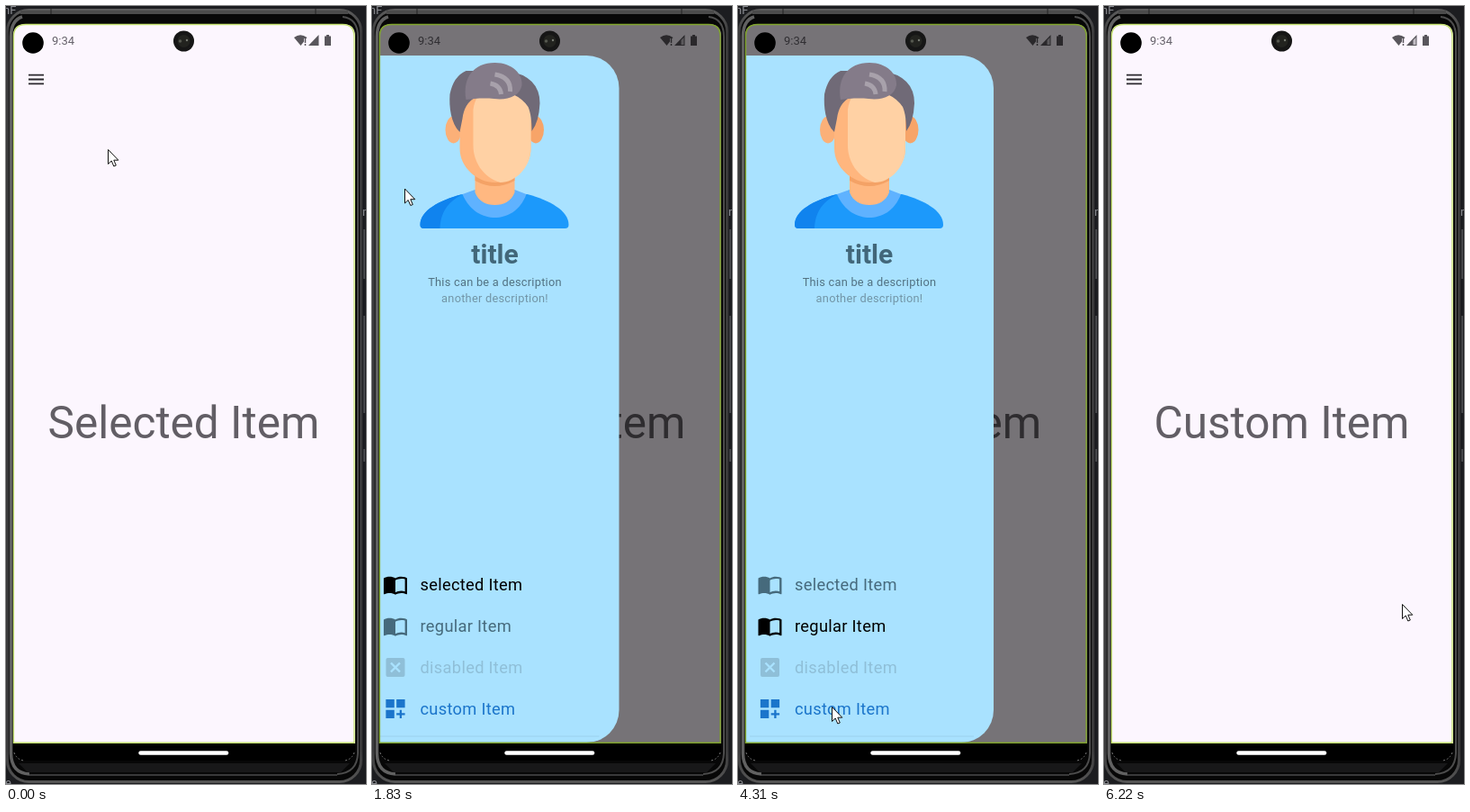
These frames come from a looping animation (400x864 px, 6.54 s). An HTML page:

```html
<!DOCTYPE html>
<html lang="en">
<head>
<meta charset="utf-8">
<title>Navigation drawer</title>
<style>
html, body { margin: 0; width: 100%; height: 100%; overflow: hidden; background: #1c1d20; }
svg { display: block; width: 100vw; height: 100vh; }
text { font-family: Roboto, sans-serif; }
.mid { text-anchor: middle; }
.item text { font-size: 18.3px; letter-spacing: .3px; }
.note { font-size: 12.8px; letter-spacing: .25px; }
</style>
</head>
<body>
<svg viewBox="0 0 400 864">
  <defs>
    <clipPath id="screen"><path d="M8 819V34Q8 20 22 20H374Q388 20 388 34V819Z"/></clipPath>
    <linearGradient id="rim" x2="0" y2="1">
      <stop offset="0" stop-color="#5c5c5c"/>
      <stop offset=".03" stop-color="#3a3a3b"/>
      <stop offset=".96" stop-color="#3a3a3b"/>
      <stop offset="1" stop-color="#555"/>
    </linearGradient>
    <g id="book">
      <path transform="scale(1.18) translate(-12 -12)" d="M21 5C19.900 4.650 18.700 4.500 17.500 4.500C15.500 4.500 13.500 4.900 12 6C10.500 4.900 8.500 4.500 6.500 4.500S2.500 4.900 1 6V20.700Q1.200 21.300 1.800 21.100C3.100 20.400 5 20 6.500 20C8.500 20 10.500 20.400 12 21.500C13.400 20.600 15.800 20 17.500 20C19.200 20 20.800 20.300 22.200 21.100Q22.800 21.200 23 20.600V6Q22.100 5.300 21 5ZM21 18.500C19.900 18.200 18.700 18 17.500 18C15.800 18 13.400 18.600 12 19.500V8C13.400 7.100 15.800 6.500 17.500 6.500C18.700 6.500 19.900 6.600 21 7Z"/>
    </g>
    <g id="box">
      <rect x="-10.500" y="-10.500" width="21" height="21" rx="2"/>
      <path d="M-5 -5L5 5M5 -5L-5 5" stroke="#a9e2ff" stroke-width="2.400"/>
    </g>
    <g id="tiles">
      <path d="M-10.600 -10.600H-1.200V-1.200H-10.600ZM1.200 -10.600H10.600V-1.200H1.200ZM-10.600 1.200H-1.200V10.600H-10.600Z"/>
      <path d="M5.900 1.200V10.600M1.200 5.900H10.600" stroke="currentColor" stroke-width="2.300"/>
    </g>
  </defs>

  <!-- phone body -->
  <rect width="400" height="864" fill="#1c1d20"/>
  <g fill="#8d8f94" font-size="13">
    <text x="-3" y="9">nF</text>
    <text x="-1" y="867">e</text>
    <text x="396" y="233">m</text>
  </g>
  <path d="M398 248V303M398 344V452M398 492V506" stroke="#56575a" stroke-width="1.500"/>
  <rect x="1.500" y="4.500" width="393" height="857" rx="24" fill="#070707" stroke="url(#rim)" stroke-width="3"/>
  <path d="M16 7H380" stroke="#4b4b4b" stroke-width="4"/>
  <path d="M344 3V9M50 3V9" stroke="#222"/>
  <path d="M18 12Q5.500 16 5.500 34V830Q6 852 26 853" fill="none" stroke="#616161" stroke-width="3.500"/>
  <path d="M374 12Q391 14 391 34V830Q390 852 368 853" fill="none" stroke="#4c4c4c" stroke-width="2"/>
  <path d="M26 854H368" stroke="#39393a" stroke-width="2"/>
  <path d="M14 841H382L372 851H24Z" fill="#181819"/>
  <path d="M8 818H388V826Q387 838 374 838H22Q9 838 8 826Z" fill="#000"/>
  <path d="M9 829Q12 837 20 838M387 829Q384 837 376 838" fill="none" stroke="#777" stroke-dasharray="2 2"/>
  <rect x="147.300" y="827.200" width="100" height="4.500" rx="2.250" fill="#fff"/>

  <g clip-path="url(#screen)">
    <rect x="8" y="20" width="380" height="800" fill="#fcf6fe"/>
    <text x="51" y="43" font-size="13" fill="#65616a">9:34</text>
    <g fill="#59565c">
      <path d="M320 35Q327 29.500 334.500 35L327.500 44Z"/>
      <path d="M332.500 36V41M332.500 42V44" stroke="#fcf6fe" stroke-width="3"/>
      <path d="M332.500 36V41M332.500 42V44" stroke="#59565c" stroke-width="1.500"/>
      <path d="M336 44L347.500 32V44Z"/>
      <path id="weak" d="M343.500 43V38L346.500 35V43Z" fill="#fcf6fe" opacity=".65"/>
      <path d="M354 33.500H356V32H359V33.500H361V44H354Z"/>
    </g>
    <path d="M25 76.700H42M25 81.500H42M25 86.300H42" stroke="#29272c" stroke-width="1.800"/>
    <text id="page" class="mid" x="197.500" y="480" font-size="49.500" fill="#625e65"></text>
    <rect id="scrim" x="8" y="20" width="380" height="800" fill="#000"/>

    <g id="drawer">
      <path d="M9 55H248A36 36 0 0 1 284 91V782A36 36 0 0 1 248 818H9Z" fill="#a9e2ff"/>
      <path d="M13 811H262" stroke="#9bd1ec"/>
      <!-- portrait -->
      <path d="M63 243C63 227 84 216 110 209H182C207 216 228 227 228 243Q228 247 224 247H67Q63 247 63 243Z" fill="#1c99fb"/>
      <path d="M63 243C63 227 84 216 110 209C92 219 86 230 85 247H67Q63 247 63 243Z" fill="#1083ee"/>
      <path d="M110 209C118 228 133 235 146 235S174 228 181 209L168 204H124Z" fill="#5fb2ff"/>
      <path d="M124 180H168V207C164 217 156 221 146 221S128 217 124 207Z" fill="#ffb881"/>
      <path d="M124 187Q145 203 168 187V194Q146 206 124 194Z" fill="#f4a266"/>
      <ellipse cx="100" cy="137.500" rx="9" ry="15" fill="#fbb078"/>
      <ellipse cx="191.500" cy="137.500" rx="9" ry="15" fill="#f7a468"/>
      <path d="M107 112C107 95 125 86 146 86S186 95 186 112V158C186 180 165 196 146 196S107 180 107 158Z" fill="#ffb67e"/>
      <path d="M122 115Q124 98 138 92L178 94L186 112V158C186 180 168 196 152 196C132 190 122 172 122 155Z" fill="#ffd1a4"/>
      <path d="M107 140C97 130 95 112 96 98Q100 78 114 72H160Q196 78 196 108Q195 129 187 139C187 128 186 119 183 112Q177 103 166 98L160 101H125Q112 108 110 125Z" fill="#706a77"/>
      <path d="M114 104C110 80 122 63 146 63C166 63 177 76 176 88C174 100 160 105 145 103C133 102 122 103 114 104Z" fill="#847b89"/>
      <path d="M146 76Q164 79 163 95M141 86Q152 88 153 98" fill="none" stroke="#a8a1ab" stroke-width="5"/>
      <text class="mid" x="146" y="286" font-size="30" font-weight="700" fill="#42677a">title</text>
      <text class="mid note" x="146" y="311" fill="#527283">This can be a description</text>
      <text class="mid note" x="146" y="329" fill="#7295a7">another description!</text>
      <g id="items"></g>
    </g>
  </g>
  <path id="edge" d="M8.500 818.300V34Q8.500 20.500 22 20.500H374Q387 20.500 387 34V818.300Z" fill="none" stroke-width="1.400"/>

  <circle cx="30" cy="41" r="11.800" fill="#000"/>
  <circle cx="197.500" cy="39" r="11.500" fill="#161616"/>
  <circle cx="197.500" cy="39" r="7" fill="#22231f"/>
  <circle cx="193.500" cy="39" r="1.800" fill="#55584f"/>
  <circle cx="201" cy="38" r="1.200" fill="#777a72"/>

  <path id="cursor" d="M.5 .5V16.500L4.200 13L6.800 19L9.300 18L6.800 12.200H11.800Z" fill="#fff" stroke="#111" stroke-linejoin="round"/>
</svg>
<script>
const LOOP = 6540;
const SHUT = -278;
const IDLE = '#466a7c';
const $ = id => document.getElementById(id);

const items = [
  { label: 'selected Item', icon: 'book', page: 'Selected Item', idle: IDLE, on: '#000' },
  { label: 'regular Item', icon: 'book', page: 'Regular Item', idle: IDLE, on: '#000' },
  { label: 'disabled Item', icon: 'box', idle: '#8fbfd8' },
  { label: 'custom Item', icon: 'tiles', page: 'Custom Item', idle: '#1b75cb', on: '#fff' }
];

$('items').innerHTML = items.map((it, i) =>
  `<g class="item" transform="translate(0 ${643 + 46 * i})" fill="currentColor">
    <use href="#${it.icon}" x="35.500" y="-.5"/><text x="63" y="6">${it.label}</text></g>`).join('');
const rows = [...$('items').children];

// time, x, y of the pointer tip
const path = [
  [0, 113, 159], [40, 113, 159], [480, 29, 84], [1620, 29, 84], [1830, 36, 202],
  [2530, 66, 565], [3000, 80, 640], [3450, 92, 692], [3950, 92, 692], [4300, 104, 778],
  [4500, 104, 778], [4900, 331, 669], [5330, 331, 669], [5600, 331, 664], [LOOP, 331, 664]
];

function slope(i, k) {
  const a = path[i - 1], b = path[i], c = path[i + 1];
  if (!a || !c || a[k] === b[k] || b[k] === c[k]) return 0;
  return (c[k] - a[k]) / (c[0] - a[0]);
}

function pointer(t, k) {
  let i = 0;
  while (i < path.length - 2 && t >= path[i + 1][0]) i++;
  const a = path[i], b = path[i + 1], d = b[0] - a[0], u = (t - a[0]) / d;
  const s = u * u * (3 - 2 * u);
  return a[k] + (b[k] - a[k]) * s
    + d * u * (1 - u) * ((1 - u) * slope(i, k) - u * slope(i + 1, k));
}

function ease(t, from, to) {
  const u = Math.min(1, Math.max(0, (t - from) / (to - from))) ** .75;
  return u * u * (3 - 2 * u);
}

const mix = (a, b, u) => a.map((v, i) => Math.round(v + (b[i] - v) * u));

function draw(t) {
  const x = SHUT
    + (-9.5 - SHUT) * ease(t, 1595, 1820)
    + 9.5 * ease(t, 3470, 3620)
    + SHUT * ease(t, 5320, 5580);
  const open = Math.min(1, (x - SHUT) / (-9.5 - SHUT));
  const chosen = t < 3900 ? 0 : t < 4450 ? 1 : 3;

  $('drawer').setAttribute('transform', `translate(${x.toFixed(2)} 0)`);
  $('scrim').setAttribute('opacity', (.53 * open).toFixed(3));
  $('edge').setAttribute('stroke', `rgb(${mix([196, 224, 112], [128, 164, 44], open)})`);
  $('weak').style.display = t < 1700 ? 'none' : '';
  $('page').textContent = items[chosen].page;
  rows.forEach((row, i) => row.style.color = i === chosen ? items[i].on : items[i].idle);
  $('cursor').setAttribute('transform',
    `translate(${pointer(t, 1).toFixed(1)} ${pointer(t, 2).toFixed(1)})`);
}

const start = performance.now();
function tick(now) {
  draw(Math.max(0, now - start) % LOOP);
  requestAnimationFrame(tick);
}
draw(0);
requestAnimationFrame(tick);
</script>
</body>
</html>
```
